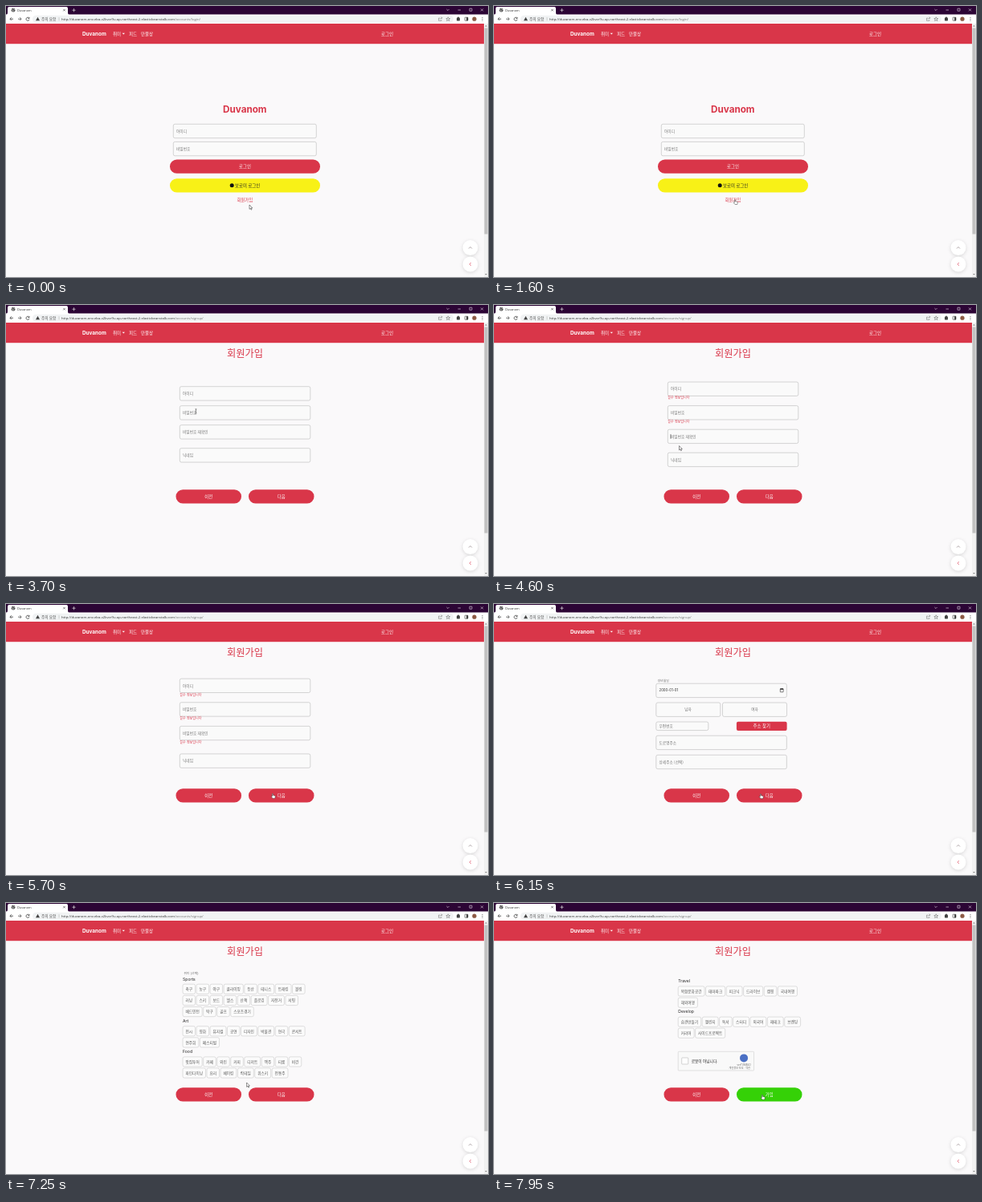
An HTML page that plays this animation: 600 by 338 pixels, repeating every 8000 ms.

```html
<!DOCTYPE html>
<html lang="ko">
<head>
<meta charset="utf-8">
<title>Duvanom</title>
<style>
  html, body { margin: 0; width: 100%; height: 100%; overflow: hidden; background: #faf9fa; }
  svg { display: block; width: 100%; height: 100%; }
  text { font-family: "Noto Sans CJK KR", "Noto Sans CJK", sans-serif; white-space: pre; }
  .latin { font-family: Inter, sans-serif; }
  .ui { font-family: "Open Sans", "Noto Sans CJK KR", sans-serif; }
  .round { filter: drop-shadow(0 1px 2px rgba(0, 0, 0, .14)); }
</style>
</head>
<body>
<svg id="stage" viewBox="0 0 600 338"></svg>
<script>
const LOOP = 8000, RED = '#d93649', INK = '#333', SOFT = '#777';
const stage = document.getElementById('stage');

// Markup helpers; text is placed by its vertical middle.
const rect = (x, y, w, h, fill, r = 0, stroke = 'none') =>
  `<rect x="${x}" y="${y}" width="${w}" height="${h}" rx="${r}" fill="${fill}" stroke="${stroke}" stroke-width=".6"/>`;
const circle = (x, y, r, fill, extra = '') => `<circle cx="${x}" cy="${y}" r="${r}" fill="${fill}" ${extra}/>`;
const line = (d, color, width = .7, extra = '') =>
  `<path d="${d}" fill="none" stroke="${color}" stroke-width="${width}" ${extra}/>`;
const text = (x, y, size, str, fill = INK, extra = '') =>
  `<text x="${x}" y="${y + size * .37}" font-size="${size}" fill="${fill}" ${extra}>${str}</text>`;
const MID = 'text-anchor="middle"';
const group = (id, body, extra = '') => `<g id="${id}" ${extra}>${body}</g>`;
const field = (x, y, w, label, h = 17.4) =>
  rect(x, y, w, h, '#fafafa', 2, '#b9b9b9') + text(x + 3.7, y + h / 2, 4.7, label, SOFT);
const button = (x, y, w, h, r, label, fill = RED, size = 5.4) =>
  rect(x, y, w, h, fill, r) + text(x + w / 2, y + h / 2, size, label, '#fff', MID + ' font-weight="500"');

const CHAR = 4.32;
function chips(x, y, words) {
  return words.split(' ').map(word => {
    const w = word.length * CHAR + 6.9;
    const chip = rect(x, y - 6.1, w, 12.2, '#fbfbfb', 2, '#c9c9c9') +
      text(x + w / 2, y, 4.7, word, '#555', MID);
    x += w + 1.5;
    return chip;
  }).join('');
}
const heading = (x, y, str) => text(x, y, 5.1, str, '#222', 'class="latin"');

function browser() {
  const url = 'http://duvanom-env.eba-v2kvxr9u.ap-northeast-2.elasticbeanstalk.com';
  const address = path => text(69, 16.2, 4.28,
    `${url}<tspan fill="#777">/accounts/${path}/</tspan>`, INK, 'class="ui"');
  return rect(0, 0, 600, 11, '#2c0535') +
    '<path d="M0 11Q2 11 2 8V3Q2 1 4 1H75Q77 1 77 3V8Q77 11 79 11Z" fill="#fff"/>' +
    group('favicon', circle(9, 5.2, 2.4, '#555') + line('M7.3 4.6L9 5.4L8.6 7M9.4 3.4L10.7 4.8', '#ddd', .7)) +
    group('spinner', line('M9 2.8A2.4 2.4 0 0 1 11.4 5.2', '#555', .8)) +
    text(14, 5.3, 3.9, 'Duvanom', INK, 'class="ui"') +
    line('M71.3 4L73.7 6.4M73.7 4L71.3 6.4', '#333', .6) +
    line('M82.4 5.2H86.6M84.5 3.1V7.3', '#ddd', .7) +
    line('M548.4 4L550 5.6L551.6 4M562.5 5H566M577 3.2H580V6.2H577ZM591 3.4L594 6.4M594 3.4L591 6.4', '#e8e0ea', .6) +
    rect(0, 10.5, 600, 11.5, '#fff') + rect(33, 11.8, 524, 9, '#f1f3f4', 4.5) +
    line('M9 16.2H5M6.8 14.3L4.9 16.2L6.8 18.1', '#444', .8) +
    line('M15 16.2H19M17.2 14.3L19.1 16.2L17.2 18.1', '#555', .8) +
    group('reload', line('M28.7 15.1A2 2 0 1 0 29 16.8M29 13.9V15.5H27.4', '#444', .8)) +
    group('stop', line('M25.3 14.5L28.7 17.9M28.7 14.5L25.3 17.9', '#444', .8)) +
    '<path d="M39.5 13.8L42 18.3H37Z" fill="#444"/>' +
    text(44, 16.2, 4.6, '주의 요함', '#555') + line('M66 14V18.4', '#aaa', .5) +
    group('loginUrl', address('login')) + group('signupUrl', address('signup')) +
    line('M540 15H538.6V18.3H542V17M540 16.6Q540.4 14.8 543 14.8M541.8 13.6L543 14.8L541.8 16', '#666', .5) +
    '<path d="M550.3 13.8L551 15.5L552.8 15.6L551.4 16.7L551.9 18.5L550.3 17.5L548.7 18.5L549.2 16.7L547.8 15.6L549.6 15.5Z" fill="none" stroke="#555" stroke-width=".5"/>' +
    rect(561, 14.6, 4, 3.8, '#444', .6) + circle(563, 14.5, 1, '#444') +
    rect(571.2, 14.2, 3.8, 4, '#fff', .3, '#333') + rect(573.2, 14.2, 1.8, 4, '#333') +
    circle(583, 16.2, 2.6, '#8d5a45') +
    [14.4, 16.2, 18].map(y => circle(593, y, .5, '#444')).join('');
}

function siteFrame() {
  const nav = (x, str) => text(x, 34.5, 5.5, str, '#fff', 'font-weight="500"');
  const round = (y, d, color) => circle(578, y, 9.5, '#fff', 'class="round"') + line(d, color, .7);
  return rect(0, 22, 600, 316, '#faf9fa') + rect(0, 22, 595, 25.2, RED) +
    text(95, 34.7, 6.4, 'Duvanom', '#fff', 'class="latin" font-weight="700"') +
    nav(133, '취미') + '<path d="M144.6 33.8H148L146.3 35.6Z" fill="#fff"/>' +
    nav(153, '피드') + nav(168, '만물상') + nav(467, '로그인') +
    rect(595, 22, 5, 316, '#f1f1f1') + rect(595.5, 27.5, 4, 257, '#c1c1c1') +
    '<path d="M596.2 25.6H598.8L597.5 24ZM596.2 334H598.8L597.5 335.6Z" fill="#777"/>' +
    round(301.5, 'M576 302.5L578 300.5L580 302.5', '#8f7f83') +
    round(322, 'M579 320L577 322L579 324', '#e0566a');
}

function loginPage() {
  return text(297.3, 129, 11.7, 'Duvanom', RED, MID + ' class="latin" font-weight="700"') +
    field(208.3, 147.3, 178, '아이디') + field(208.3, 169.4, 178, '비밀번호') +
    button(204, 191.5, 187, 17.3, 8.6, '로그인') +
    rect(204, 215.2, 187, 17.3, '#f8f117', 8.6) + circle(281.2, 223.8, 2.5, '#111') +
    text(285, 223.8, 5.4, '보로미 로그인', '#222') +
    text(297.3, 242, 5.4, '회원가입', RED, MID);
}

const LABELS = ['아이디', '비밀번호', '비밀번호 재확인', '닉네임'];
const accountStep = () => LABELS.map((label, i) =>
  group('row' + i, field(216.3, 0, 162.5, label) +
    group('error' + i, text(216.3, 20, 4.05, '필수 정보입니다', RED)) +
    group('caret' + i, line('M220 6V11.6', '#222', .6)))).join('');

const personStep = () =>
  text(218, 95.5, 3.9, '생년월일', SOFT) + field(216.3, 99.2, 162.5, '') +
  text(220, 107.9, 4.3, '2000-01-01', INK, 'class="latin"') +
  rect(370.8, 105.8, 3.8, 4, '#fff', .3, '#222') + rect(370.8, 105.4, 3.8, 1.3, '#222') +
  rect(216.3, 123, 80, 17.4, '#fafafa', 2, '#b9b9b9') + text(256, 131.7, 4.7, '남자', SOFT, MID) +
  rect(299, 123, 80, 17.4, '#fafafa', 2, '#b9b9b9') + text(339, 131.7, 4.7, '여자', SOFT, MID) +
  field(216.3, 147, 65, '우편번호', 10.6) + button(316.4, 146.8, 62.7, 11.2, 2, '주소 찾기') +
  field(216.3, 164.2, 162.5, '도로명주소') + field(216.3, 188.3, 162.5, '상세주소 (선택)');

const photoStep = () => circle(297.3, 141, 32, '#fff') + circle(297.3, 130.3, 12.6, '#2b2f30') +
  '<path d="M278 165V161Q279 146 290 143.5Q297.3 148 304.6 143.5Q316 146 317 161V165Z" fill="#2b2f30"/>' +
  button(264, 176, 67, 11.2, 2, '프로필 사진 지정 (필수)', RED, 4.9);

const hobbyStep = () => text(221.5, 87.5, 3.9, '취미 (선택)', SOFT) +
  heading(220, 95, 'Sports') +
  chips(220, 107.3, '축구 농구 야구 클라이밍 등산 테니스 트래킹 볼링') +
  chips(220, 121.5, '러닝 스키 보드 헬스 산책 플로깅 자전거 서핑') +
  chips(220, 135.6, '배드민턴 탁구 골프 스포츠경기') +
  heading(220, 147, 'Art') +
  chips(220, 159.8, '전시 영화 뮤지컬 공연 디자인 박물관 연극 콘서트') +
  chips(220, 173.9, '연주회 페스티벌') +
  heading(220, 185.5, 'Food') +
  chips(220, 198, '맛집투어 카페 와인 커피 디저트 맥주 티룸 비건') +
  chips(220, 212, '파인다이닝 요리 베이킹 칵테일 위스키 전통주');

const finalStep = () => heading(220, 97.3, 'Travel') +
  chips(220, 110, '복합문화공간 테마파크 피크닉 드라이브 캠핑 국내여행') +
  chips(220, 124.2, '해외여행') +
  heading(220, 135.6, 'Develop') +
  chips(220, 148.2, '습관만들기 챌린지 독서 스터디 외국어 재테크 브랜딩') +
  chips(220, 162.2, '커리어 사이드프로젝트') +
  rect(220, 185.3, 94.3, 23.7, '#f9f9f9', .8, '#cfcfcf') + rect(224.5, 193, 8, 8, '#fff', .6, '#b5b5b5') +
  text(236.5, 197, 4.7, '로봇이 아닙니다.', '#222') + circle(301.8, 193.4, 5, '#4a6fc4') +
  text(301.8, 202, 3.1, 'verTUMBLO', '#666', MID + ' class="ui"') +
  text(296.5, 206.3, 3.1, '개인정보 보호 · 약관', '#666', MID);

const STEPS = [accountStep, personStep, photoStep, hobbyStep, finalStep];
const signupPage = () => text(297.5, 60, 12.2, '회원가입', RED, MID + ' font-weight="500"') +
  `<g clip-path="url(#window)">${STEPS.map((step, i) => group('step' + i, step())).join('')}</g>` +
  button(211.5, 230.2, 81.5, 17.3, 8.6, '이전') +
  group('next', button(302, 230.2, 81.5, 17.3, 8.6, '다음')) +
  group('join', button(302, 230.2, 81.5, 17.3, 8.6, '가입', '#35d107'));

const POINTERS = {
  arrow: '<path d="M0 0V5.4L1.3 4.3L2.2 6.2L3 5.8L2.1 4H3.8Z" fill="#fff" stroke="#222" stroke-width=".5"/>',
  hand: '<path d="M-.6 .3Q0 -.4 .5 .3V2.2L3 2.8Q3.5 3 3.3 4L2.7 6H.1L-1.8 3.8Q-1.8 3 -.6 3.6Z" fill="#fff" stroke="#222" stroke-width=".45"/>',
  beam: line('M-1 -2.6H1M0 -2.6V2.6M-1 2.6H1', '#333', .55)
};

stage.innerHTML = '<clipPath id="window"><rect x="195" y="78" width="205" height="148"/></clipPath>' +
  siteFrame() + browser() + group('login', loginPage()) + group('signup', signupPage()) +
  group('pointer', Object.entries(POINTERS).map(([id, art]) => group(id, art)).join(''));

const parts = Object.fromEntries([...stage.querySelectorAll('g[id]')].map(g => [g.id, g]));
const show = (id, on) => parts[id].setAttribute('display', on ? 'inline' : 'none');
const move = (id, x, y) => parts[id].setAttribute('transform', `translate(${x} ${y})`);
const ease = (t, start, span) => {
  const p = Math.min(1, Math.max(0, (t - start) / span));
  return p * p * (3 - 2 * p);
};

const PAGE_CHANGE = 2250, LOADING = [1820, 3040];
const FOCUS = [3350, 3750, 4350, 4800];
const SLIDES = [5730, 6099, 6730, 7672], SLIDE_TIME = 320, SLIDE_WIDTH = 205;

// time, x, y, pointer shape from that time on
const PATH = [
  [0, 303, 248, 'arrow'], [50, 303, 248, 'arrow'], [400, 300, 241.5, 'hand'],
  [1900, 300, 241.5, 'hand'], [2250, 296, 236, 'arrow'], [2550, 256, 141, 'beam'],
  [2750, 250.5, 131, 'beam'], [3050, 250.5, 131, 'beam'], [3200, 250.5, 131, 'beam'],
  [3350, 242, 112, 'beam'], [3500, 242, 112, 'beam'], [3740, 236, 134, 'beam'],
  [4050, 236, 134, 'beam'], [4330, 233, 163, 'beam'], [4550, 230.5, 175.6, 'arrow'],
  [4620, 230.5, 175.6, 'arrow'], [4780, 231, 194, 'beam'], [4900, 231, 194, 'beam'],
  [5150, 212, 207, 'arrow'], [5480, 310, 234, 'hand'], [5650, 332, 236.4, 'hand'],
  [6800, 332, 237.2, 'hand'], [7080, 310, 229, 'arrow'], [7230, 299.6, 224, 'arrow'],
  [7520, 299.6, 224, 'arrow'], [7600, 318, 232, 'hand'], [7680, 334, 239.2, 'hand'],
  [LOOP, 334, 239.2, 'hand']
];

function drawPointer(t) {
  const i = PATH.findIndex((p, k) => k + 1 === PATH.length - 1 || t < PATH[k + 1][0]);
  const [t0, x0, y0, shape] = PATH[i], [t1, x1, y1] = PATH[i + 1];
  const p = ease(t, t0, t1 - t0);
  move('pointer', x0 + (x1 - x0) * p, y0 + (y1 - y0) * p);
  for (const id in POINTERS) show(id, id === shape);
}

function drawAccountRows(t) {
  const focused = FOCUS.filter(f => t >= f).length - 1;
  const errors = Math.max(0, focused);
  let y = 101.7 - 2.85 * errors;
  LABELS.forEach((_, i) => {
    move('row' + i, 0, y);
    show('error' + i, i < errors);
    show('caret' + i, i === focused && (t - FOCUS[i]) % 500 < 300);
    y += (i === 2 ? 29 : 24) + (i < errors ? 5.6 : 0);
  });
}

function draw(t) {
  const loading = t >= LOADING[0] && t < LOADING[1], signup = t >= PAGE_CHANGE;
  show('favicon', !loading);
  show('reload', !loading);
  show('spinner', loading);
  show('stop', loading);
  parts.spinner.setAttribute('transform', `rotate(${(t - 2800) * .6 - 45} 9 5.2)`);
  show('login', !signup);
  show('loginUrl', !signup);
  show('signup', signup);
  show('signupUrl', signup);

  drawAccountRows(t);
  const position = SLIDES.reduce((sum, start) => sum + ease(t, start, SLIDE_TIME), 0);
  STEPS.forEach((_, i) => {
    move('step' + i, (i - position) * SLIDE_WIDTH, 0);
    show('step' + i, Math.abs(i - position) < 1);
  });
  const last = t >= SLIDES[3];
  show('next', !last);
  show('join', last);
  drawPointer(t);
}

const begin = performance.now();
function tick() {
  draw((performance.now() - begin) % LOOP);
  requestAnimationFrame(tick);
}
tick();
</script>
</body>
</html>
```
